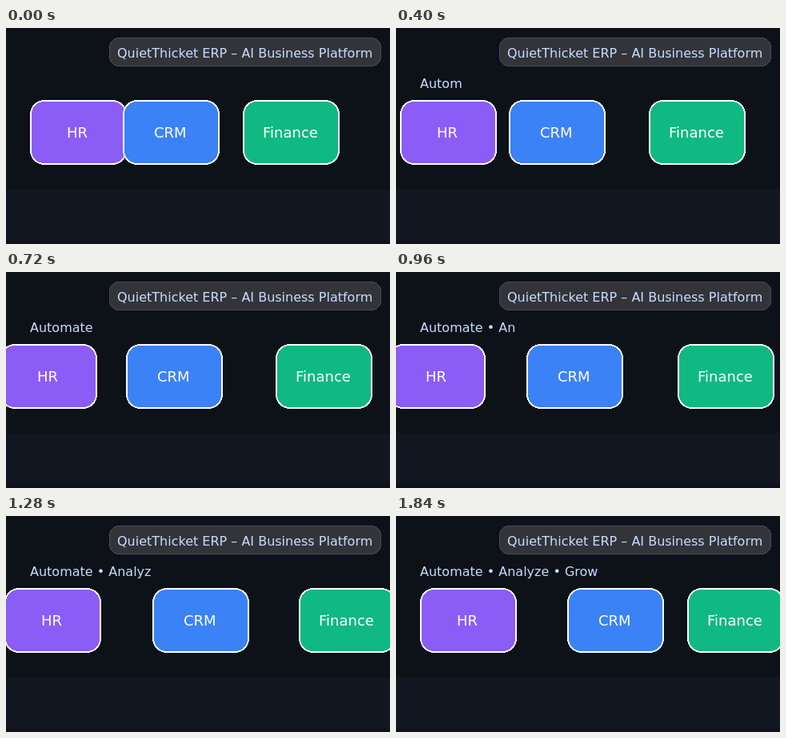
Recreate the animation shown at these times as an HTML page with a canvas. Size 480 by 270 pixels, loop 1.92 s.

```html
<!DOCTYPE html>
<html lang="en">
<head>
<meta charset="utf-8">
<title>Business platform banner</title>
<style>
  html, body { margin: 0; width: 100%; height: 100%; overflow: hidden; background: #0d1218; }
  canvas { display: block; width: 480px; height: 270px; }
</style>
</head>
<body>
<canvas id="stage" width="480" height="270"></canvas>
<script>
const ctx = document.getElementById('stage').getContext('2d');
const STEP = 80, STEPS = 24;
const TITLE = 'QuietThicket ERP – AI Business Platform';
const TAGLINE = 'Automate • Analyze • Grow';
const CARDS = [
  ['HR', '#8b5cf6'],
  ['CRM', '#3b82f6'],
  ['Finance', '#10b981']
];

// Rounded box filled row by row, so its corners stay crisp.
function box(x, y, w, h, r, color) {
  ctx.fillStyle = color;
  for (let row = 0; row < h; row++) {
    const edge = Math.min(row, h - 1 - row);
    const d = Math.max(0, r - edge - 0.5);
    const inset = Math.round(r - Math.sqrt(r * r - d * d));
    ctx.fillRect(x + inset, y + row, w - 2 * inset, 1);
  }
}

function framedBox(x, y, w, h, r, line, fill, edge) {
  box(x, y, w, h, r, edge);
  box(x + line, y + line, w - 2 * line, h - 2 * line, r - line, fill);
}

function label(text, x, y, size, color) {
  ctx.font = size + 'px "DejaVu Sans", sans-serif';
  ctx.fillStyle = color;
  ctx.fillText(text, x, y);
}

function background() {
  ctx.fillStyle = '#0d1218';
  ctx.fillRect(0, 0, 480, 202);
  ctx.fillStyle = '#121620';
  ctx.fillRect(0, 202, 480, 64);
  ctx.fillStyle = '#130f1a';
  ctx.fillRect(0, 266, 480, 4);
}

function card(k, t) {
  const [name, color] = CARDS[k];
  const swing = 40 * Math.sin(Math.PI * (t - 1 + k / 3));
  const x = 30 + 150 * k + Math.trunc(swing);
  framedBox(x, 90, 121, 81, 18, 2, color, '#fff');
  ctx.font = '18px "DejaVu Sans", sans-serif';
  const half = Math.round(ctx.measureText(name).width / 2);
  label(name, x + 59 - half, 137, 18, '#fff');
}

function draw(now) {
  const step = Math.floor(now / STEP) % STEPS;
  const t = step / (STEPS - 1);
  background();
  framedBox(129, 12, 340, 36, 12, 1, '#323439', '#494b50');
  label(TITLE, 139, 37, 16, '#c8dcff');
  label(TAGLINE.slice(0, Math.floor(TAGLINE.length * t)), 30, 75, 16, '#c8dcff');
  CARDS.forEach((_, k) => card(k, t));
}

function loop() {
  draw(performance.now());
  requestAnimationFrame(loop);
}
loop();
</script>
</body>
</html>
```
